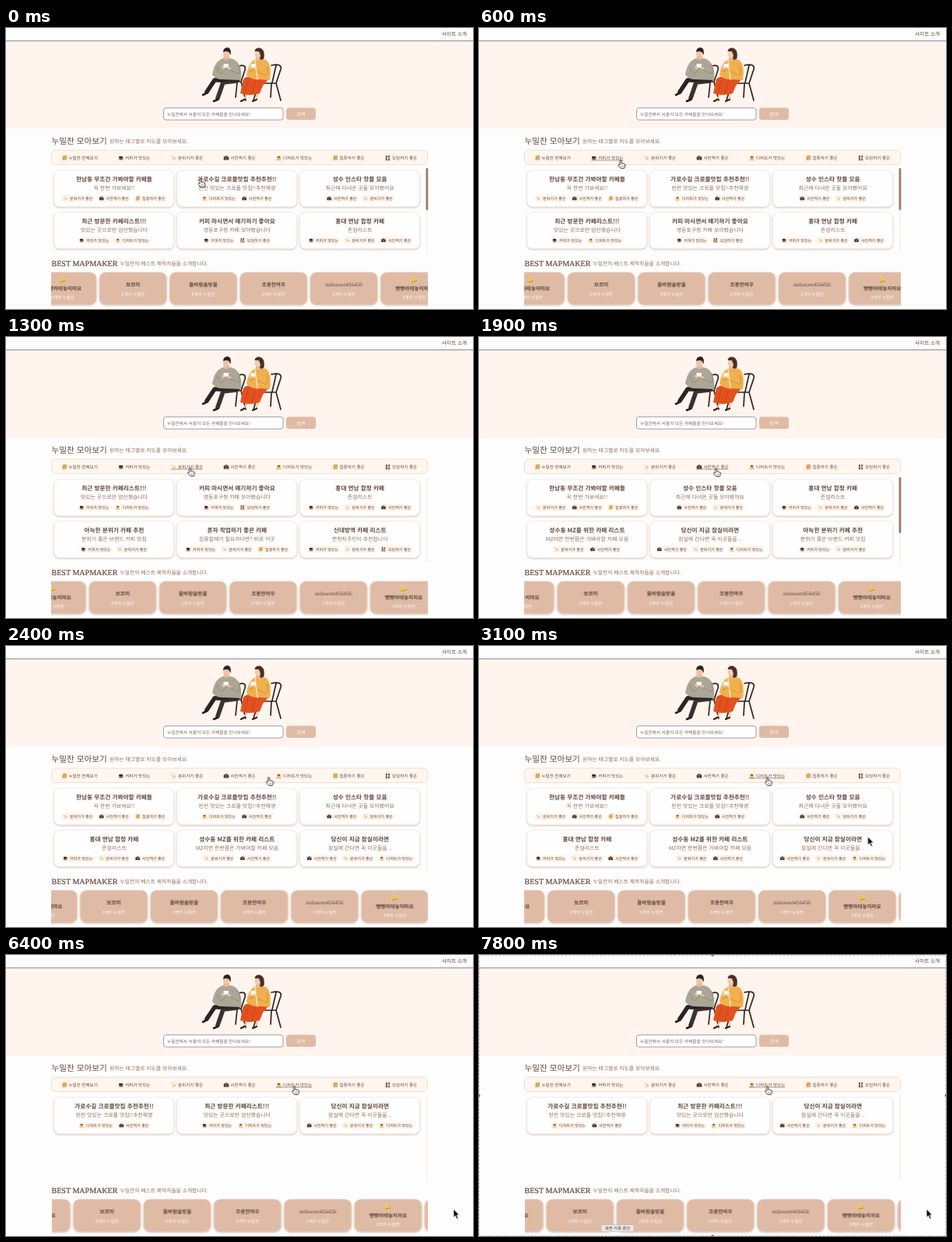
These frames come from a looping animation (600 by 361 pixels, 8.2 s). An HTML page:

```html
<!DOCTYPE html>
<html lang="ko">
<head>
<meta charset="utf-8">
<title>카페 지도 모아보기</title>
<style>
html, body { margin: 0; width: 100%; height: 100%; overflow: hidden; background: #fefdfd; }
svg { display: block; width: 100vw; height: 100vh; }
text { font-family: "Noto Sans CJK KR", "Noto Sans CJK", sans-serif; text-rendering: geometricPrecision; }
.serif { font-family: "Liberation Serif", "Noto Sans CJK KR", serif; }
.card { filter: drop-shadow(.8px 1px .9px #c8a692b0); }
.list, .line, #arrow, #frame, #tip { opacity: 0; animation: 8.2s step-end infinite; }

#list0 { animation-name: l0; }
#list1 { animation-name: l1; }
#list2 { animation-name: l2; }
#list3 { animation-name: l3; }
#list4 { animation-name: l4; }
@keyframes l0 { 0% { opacity: 1 } 10.96%, 100% { opacity: 0 } }
@keyframes l1 { 0% { opacity: 0 } 10.96% { opacity: 1 } 19.5%, 100% { opacity: 0 } }
@keyframes l2 { 0% { opacity: 0 } 19.5% { opacity: 1 } 28.04%, 100% { opacity: 0 } }
@keyframes l3 { 0% { opacity: 0 } 28.04% { opacity: 1 } 39.01%, 100% { opacity: 0 } }
@keyframes l4 { 0% { opacity: 0 } 39.01%, 100% { opacity: 1 } }

#line1 { animation-name: u1; }
#line2 { animation-name: u2; }
#line3 { animation-name: u3; }
#line4 { animation-name: u4; }
@keyframes u1 { 0% { opacity: 0 } 6.09% { opacity: 1 } 12.19%, 100% { opacity: 0 } }
@keyframes u2 { 0% { opacity: 0 } 13.4% { opacity: 1 } 19.5%, 100% { opacity: 0 } }
@keyframes u3 { 0% { opacity: 0 } 20.72% { opacity: 1 } 29.26%, 100% { opacity: 0 } }
@keyframes u4 { 0% { opacity: 0 } 30.48%, 100% { opacity: 1 } }

#strip { animation: slide 8.2s infinite; }
@keyframes slide {
  0% { transform: translateX(0); animation-timing-function: steps(32); }
  39.02% { transform: translateX(-33px); animation-timing-function: step-end; }
  40.23%, 100% { transform: translateX(-33.5px); }
}

#hand { animation: point 8.2s infinite; }
@keyframes point {
  0% { transform: translate(250px, 194px); animation-timing-function: steps(6); }
  7.31%, 9.75% { transform: translate(182px, 170px); animation-timing-function: steps(4); }
  14.63%, 17.07% { transform: translate(236.5px, 168.5px); animation-timing-function: steps(4); }
  21.95%, 26.82% { transform: translate(304.5px, 169px); animation-timing-function: steps(4); }
  31.7%, 100% { transform: translate(370.5px, 169px); }
}

#arrow { animation-name: leave; }
@keyframes leave {
  0% { opacity: 0; transform: translate(371px, 170px); }
  35.36% { opacity: 1; transform: translate(385px, 175px); }
  36.58% { opacity: 1; transform: translate(448px, 213px); }
  37.8% { opacity: 1; transform: translate(499.5px, 245px); }
  39.01% { opacity: 1; transform: translate(526px, 284px); }
  40.23% { opacity: 1; transform: translate(552px, 312px); }
  41.45% { opacity: 1; transform: translate(569px, 323px); }
  42.67%, 100% { opacity: 1; transform: translate(575px, 326.5px); }
}

#frame { animation-name: select; }
#tip { animation-name: tip; }
@keyframes select { 0% { opacity: 0 } 84.14%, 100% { opacity: 1 } }
@keyframes tip { 0% { opacity: 0 } 95.11%, 100% { opacity: 1 } }
</style>
</head>
<body>
<svg viewBox="0 0 600 361" preserveAspectRatio="none">
  <defs>
    <clipPath id="window"><rect x="58.5" y="309" width="483.5" height="52"/></clipPath>
    <g id="note">
      <path d="M-1.8-3.2H2.8V2.4H-1.8Z" fill="#c88a55"/>
      <path d="M-2.8-2.2H1.8V3.2H-2.8Z" fill="#eec569"/>
      <path d="M-1.8-.4H.9M-1.8 1.2H.4" stroke="#a5683a" stroke-width=".7"/>
    </g>
    <g id="cup">
      <ellipse cy="2" rx="3.3" ry="1.1" fill="#c4b5ae"/>
      <path d="M-2.8-1.2H2.4Q2.2 2.2-.2 2.2T-2.8-1.2Z" fill="#6a5751"/>
      <ellipse cx="-.2" cy="-1.2" rx="2.6" ry="1.1" fill="#2f2220"/>
      <path d="M2.1-.6q1.500 0 .8 1.200l-1.200.5" fill="none" stroke="#6a5751" stroke-width=".6"/>
    </g>
    <g id="spark" fill="#f0c083">
      <path d="M.8-2.6Q1.1 0 3.4.4Q1.1.8.8 3.2Q.5.8-1.8.4Q.5 0 .8-2.6Z"/>
      <path d="M-1.9-3.2q.2 1.2 1.3 1.4q-1.1.2-1.3 1.4q-.2-1.2-1.3-1.4q1.1-.2 1.3-1.4Z"/>
      <circle cx="-1.7" cy="2.3" r=".7"/>
    </g>
    <g id="cam">
      <rect x="-3.3" y="-1.8" width="6.6" height="4.4" rx=".7" fill="#403639"/>
      <rect x="-1.4" y="-2.7" width="2.8" height="1.3" fill="#403639"/>
      <circle cy=".5" r="1.4" fill="#8b858c"/><circle cy=".5" r=".7" fill="#262024"/>
      <circle cx="2.4" cy="-2.2" r="1" fill="#f1c65f"/>
    </g>
    <g id="cake">
      <ellipse cy="2.4" rx="3.4" ry=".9" fill="#cfc0b4"/>
      <path d="M-1.7-2H1.7L2.6 2.300H-2.6Z" fill="#f2c25f"/>
      <path d="M-1.7-2Q0-3 1.700-2L2 -.5Q0 .4-2-.5Z" fill="#96552c"/>
    </g>
    <g id="pair">
      <path d="M-2.8-.9H-.4V1.2H-2.8Z" fill="#c46a3c"/><path d="M.4-.9H2.8V1.2H.4Z" fill="#d9a441"/>
      <path d="M-2.2 1V3.3M-1 1V3.3M1 1V3.3M2.2 1V3.3" stroke="#43393c" stroke-width=".8"/>
      <circle cx="-1.6" cy="-2.1" r="1.1" fill="#5a4033"/><circle cx="1.6" cy="-2.1" r="1.1" fill="#5a4033"/>
    </g>
    <g id="crown" transform="rotate(-14)">
      <path d="M-4.4-2.2L-2.1-.2L0-4.2L2.1-.2L4.4-2.2L3.4 3.4H-3.4Z" fill="#efc650"/>
      <path d="M-3.5 2.2H3.5" stroke="#b98a34" stroke-width="1"/>
      <circle cy="-3.6" r=".9" fill="#f8dc7c"/>
    </g>
  </defs>

  <rect width="600" height="361" fill="#fefdfd"/>
  <rect y="17" width="600" height="112.5" fill="#fff4ee"/>
  <rect y="16" width="600" height="1.1" fill="#9492a4"/>

  <g id="couple" fill="none" stroke-linecap="round" stroke-linejoin="round">
    <g stroke="#33241f" stroke-width="1.7">
      <path d="M299 49Q309 46 307 54L302 69H273M302 69L308 93M277 70L270 93M297 70L295 89"/>
      <path d="M341 48Q355 45 353 53L347 71H320M347 71L353 93M324 72L318 93M341 72L340 89M347 48L342 70"/>
    </g>
    <path d="M296 68L279 70L272 90" stroke="#3a3230" stroke-width="5.500"/>
    <path d="M298 66L268 67L258 82" stroke="#2a2422" stroke-width="5.500"/>
    <path d="M257 84L253 86M272 92L267 94" stroke="#2a1a16" stroke-width="2.600"/>
    <path d="M279 39Q268 42 265 60Q270 66 277 66L302 67Q304 48 294 41Q289 38 279 39Z" fill="#aba696"/>
    <path d="M271 50Q272 57 277 59L284 51M298 47Q302 56 299 59L286 53" stroke="#8f8a78" stroke-width=".9"/>
    <path d="M279.500 36H287V40Q283 42 279.500 40Z" fill="#e9b896"/>
    <ellipse cx="283" cy="33" rx="4" ry="5" fill="#efc4a2"/>
    <path d="M279 31Q279 25 285 25Q290 26 288.500 35L286.500 31Q283 29 279 31Z" fill="#2c2320"/>
    <path d="M279.500 46H286V50Q283 52 279.500 50Z" fill="#fffdfa"/>
    <path d="M285 51L288 52M278 50L280 52" stroke="#efc4a2" stroke-width="2.400"/>

    <path d="M312 82L306 91M323 82L322 91" stroke="#efc4a2" stroke-width="2.200"/>
    <path d="M306 92L302 94M322 92L317 94" stroke="#33201b" stroke-width="2.200"/>
    <path d="M313 62Q304 63 304 70L301 84Q313 88 326 84L330 74L338 65Z" fill="#e2511f"/>
    <path d="M311 68L307 83M320 70L316 84" stroke="#c23e16" stroke-width=".8"/>
    <path d="M321 40Q312 43 309 60Q314 67 326 66L339 67Q342 47 334 41Q328 39 321 40Z" fill="#f0b04e"/>
    <path d="M335 49Q338 58 334 61L319 54M316 49L314 57L319 52" stroke="#d08f30" stroke-width=".9"/>
    <path d="M320 41L323 66" stroke="#f9dfae" stroke-width="1.600"/>
    <path d="M321 36H327V41Q324 43 321 41Z" fill="#e9b896"/>
    <ellipse cx="323.500" cy="33.500" rx="3.800" ry="4.800" fill="#f3cbab"/>
    <path d="M319.500 30Q320 25 326 25.500Q333 27 331.500 39Q329 42 326 40Q328 34 324.500 30Z" fill="#4a3026"/>
    <path d="M314.500 46H320.500V50Q317.500 52 314.500 50Z" fill="#fffdfa"/>
    <path d="M319 52L321 51M313.500 50L315 52" stroke="#f3cbab" stroke-width="2.200"/>
  </g>

  <rect x="202.5" y="102.7" width="153.5" height="15.4" rx="3" fill="#fffefe" stroke="#9492a4" stroke-width=".9"/>
  <rect x="360" y="102.500" width="38" height="15.500" rx="3.500" fill="#dfbba6"/>
  <rect x="58.500" y="157" width="483" height="18.500" rx="5" fill="#fff6ef" stroke="#eeddc9" stroke-width=".9"/>

  <g id="page"></g>
  <g clip-path="url(#window)"><g id="strip"></g></g>

  <g id="tip">
    <rect x="157" y="346.500" width="42" height="9.200" rx="1.800" fill="#ece7e5" stroke="#b8aca8" stroke-width=".6"/>
    <text x="178" y="353" font-size="5.300" text-anchor="middle" fill="#40383a">화면 기록 중단</text>
  </g>
  <g id="frame">
    <rect x=".3" y=".3" width="599.4" height="360.4" fill="none" stroke="#a59a9a" stroke-width=".6" stroke-dasharray="3 2"/>
    <g fill="#5c5050">
      <circle cx="300" r="1.500"/><circle cx="300" cy="361" r="1.500"/>
      <circle cy="180.500" r="1.500"/><circle cx="600" cy="180.500" r="1.500"/>
    </g>
  </g>
  <g id="hand">
    <path d="M-.9.900Q-.9-.4.100-.4T1.200.900V4.100Q2.200 3.500 2.900 4.300Q4 3.800 4.500 4.800Q5.700 4.500 5.700 6V7.800L4.700 10.300H.3L-2.900 6.500Q-3.100 5-1.700 5.300L-.9 6Z" fill="#fff" stroke="#252225" stroke-width=".9" stroke-linejoin="round"/>
    <path d="M1.400 6.700V8.700M3 6.700V8.700" stroke="#252225" stroke-width=".5"/>
  </g>
  <g id="arrow">
    <path d="M0 0V10.600L2.400 8.400L4.200 12.600L6 11.800L4.200 7.700H7.500Z" fill="#0c0a0b" stroke="#fff" stroke-width=".7"/>
  </g>
</svg>
<script>
const DARK = '#5f463a', SOFT = '#8d6f5d', BRAND = '누밀잔';

const text = (x, y, size, fill, str, more = '') =>
  `<text x="${x}" y="${y}" font-size="${size}" fill="${fill}" ${more}>${str}</text>`;
const mid = (x, y, size, fill, str, more = '') =>
  text(x, y, size, fill, str, 'text-anchor="middle" ' + more);
const icon = (name, x, y, scale = 1) =>
  `<use href="#${name}" transform="translate(${x} ${y}) scale(${scale})"/>`;
const bold = 'font-weight="700"', medium = 'font-weight="500"';

const tags = {
  c: ['cup', '커피가 맛있는'],
  b: ['spark', '분위기가 좋은'],
  p: ['cam', '사진찍기 좋은'],
  d: ['cake', '디저트가 맛있는'],
  f: ['note', '집중하기 좋은'],
  m: ['pair', '모임하기 좋은']
};

const maps = {
  hannam: ['한남동 무조건 가봐야할 카페들', '꼭 한번 가보세요!!', 'bpf'],
  croffle: ['가로수길 크로플맛집 추천추천!!', '완전 맛있는 크로플 맛집!!추천해영', 'dp'],
  insta: ['성수 인스타 핫플 모음', '최근에 다녀온 곳들 모아봤어요', 'pb'],
  recent: ['최근 방문한 카페리스트!!!', '맛있는 곳으로만 엄선했습니다', 'cd'],
  talk: ['커피 마시면서 얘기하기 좋아요', '영등포구청 카페 모아봤습니다', 'cm'],
  hongdae: ['홍대 연남 합정 카페', '존엄리스트', 'cbp'],
  cozy: ['아늑한 분위기 카페 추천', '분위기 좋은 브랜드 커피 맛집', 'cb'],
  solo: ['혼자 작업하기 좋은 카페', '집중할때가 필요하다면? 바로 이곳', 'cbf'],
  local: ['신대방역 카페 리스트', '찐현지주민이 추천합니다', 'cbm'],
  mz: ['성수동 MZ를 위한 카페 리스트', 'MZ라면 한번쯤은 가봐야할 카페 모음', 'bp'],
  jamsil: ['당신이 지금 잠실이라면', '잠실에 간다면 꼭 이곳들을 ..', 'pbd']
};

// [map keys, scrollbar thumb height]
const lists = [
  ['hannam croffle insta recent talk hongdae', 54],
  ['recent talk hongdae cozy solo local', 0],
  ['hannam insta hongdae mz jamsil cozy', 72],
  ['hannam croffle insta hongdae mz jamsil', 0],
  ['croffle recent jamsil', 0]
];

function chips(keys, cx, cy) {
  const gap = 4.5;
  const items = [...keys].map(k => tags[k]);
  const widths = items.map(([, s]) => 5.05 * (.92 * (s.length - 1) + .224) + 13);
  let x = cx - (widths.reduce((a, b) => a + b) + gap * (items.length - 1)) / 2;
  return items.map(([name, str], i) => {
    const out = `<rect x="${x}" y="${cy - 4.5}" width="${widths[i]}" height="9" rx="4.5" fill="#fff4ec"/>` +
      icon(name, x + 4.8, cy, .85) + text(x + 10.7, cy + 1.8, 5.05, DARK, str);
    x += widths[i] + gap;
    return out;
  }).join('');
}

function mapCard(key, i) {
  const [title, sub, keys] = maps[key];
  const x = 61.7 + (i % 3) * 157.9, y = 183 + Math.floor(i / 3) * 53.8, cx = x + 77.2;
  return `<rect class="card" x="${x}" y="${y}" width="154" height="46.8" rx="7" fill="#fffefe" stroke="#f1e6df" stroke-width=".6"/>` +
    mid(cx, y + 14.4, 7.65, DARK, title, bold) +
    mid(cx, y + 25, 6.9, SOFT, sub) + chips(keys, cx, y + 36);
}

const list = ([keys, thumb], i) => `<g class="list" id="list${i}">` +
  '<rect x="540" y="180" width="2" height="109" fill="#faf3ee"/>' +
  (thumb ? `<rect x="539.5" y="180" width="2.8" height="${thumb}" rx="1.2" fill="#9a7c68"/>` : '') +
  keys.split(' ').map(mapCard).join('') + '</g>';

const menu = [['note', BRAND + ' 전체보기'], ...[...'cbpdfm'].map(k => tags[k])];
const menuX = [75, 147.7, 215.5, 283, 350.5, 423, 490.5];
const menuItem = ([name, str], i) => {
  const x = menuX[i], end = x + 5.5 + 5.55 * (.92 * (str.length - 1) + .224);
  return icon(name, x, 167) + text(x + 5.5, 169.1, 5.55, DARK, str) +
    `<path class="line" id="line${i}" d="M${x - 3.5} 169.900H${end}" stroke="${DARK}" stroke-width=".5"/>`;
};

document.getElementById('page').innerHTML =
  text(560, 9.6, 6.6, DARK, '사이트 소개') +
  text(207, 112.6, 5.67, '#77645c', BRAND + '에서 서울의 모든 카페들을 만나보세요!') +
  mid(379, 112.7, 6.2, '#fff6f0', '검색', medium) +
  text(58.5, 149, 10.6, DARK, BRAND + ' 모아보기', medium) +
  text(133, 147.7, 6.78, SOFT, '원하는 태그별로 지도를 모아보세요.') +
  menu.map(menuItem).join('') +
  lists.map(list).join('') +
  text(58.5, 305.6, 10.05, DARK, 'BEST MAPMAKER', `class="serif" stroke="${DARK}" stroke-width=".2"`) +
  text(146.5, 304.7, 6.75, SOFT, BRAND + '의 베스트 제작자들을 소개합니다.');

const makers = [['빵빵라테놓지마요', 3], ['보르미', 2], ['들바람솔방울', 2], ['조용한여우', 2], ['milowert456456', 1]];

function makerCard(i) {
  const [name, count] = makers[i % makers.length];
  const x = 29.9 + i * 90.3, cx = x + 43, first = count === 3, drop = first ? 4.5 : 0;
  const latin = /^[a-z]/.test(name);
  return `<rect class="card" x="${x}" y="314" width="86" height="41.3" rx="8" fill="#dfbba6" stroke="#e6cbbb" stroke-width=".6"/>` +
    (first ? icon('crown', cx - .5, 323.5) : '') +
    mid(cx, 332 + drop, latin ? 7.2 : 6.6, DARK, name, latin ? 'class="serif"' : bold) +
    mid(cx, 343.5 + drop, 5.5, '#fffdfb', `${count}개의 ${BRAND}`, medium);
}
document.getElementById('strip').innerHTML = [0, 1, 2, 3, 4, 5, 6].map(makerCard).join('');
</script>
</body>
</html>
```
